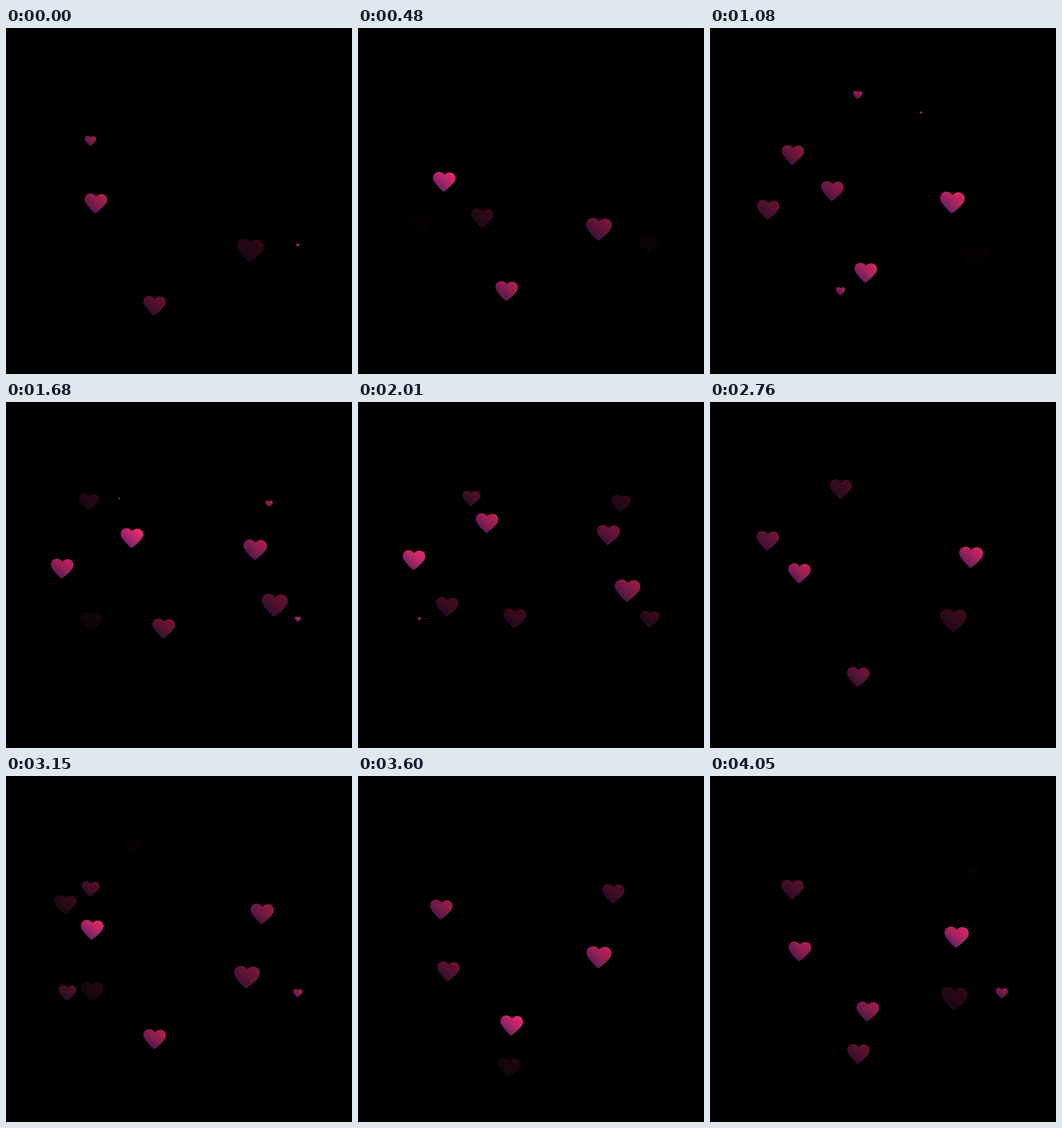
Recreate the animation shown at these times as an HTML page with a canvas. Size 500x500 px, loop 4.08 s.

```html
<!DOCTYPE html>
<html lang="en">
<head>
<meta charset="utf-8">
<title>Floating hearts</title>
<style>
html, body { margin: 0; height: 100%; overflow: hidden; background: #000; }
canvas { display: block; width: 100vmin; height: 100vmin; }
</style>
</head>
<body>
<canvas width="500" height="500"></canvas>
<script>
const LOOP = 4080, STEP = 30, FLOAT = 3060, POP = 560;
const ctx = document.querySelector('canvas').getContext('2d');

// Heart 100 units wide, centred on the origin
const heart = new Path2D('M0-31C8-42 22-46 34-41C50-35 54-15 45-2C38 10 16 32 0 44' +
  'C-16 32-38 10-45-2C-54-15-50-35-34-41C-22-46-8-42 0-31Z');
const pink = ctx.createLinearGradient(32, -40, -26, 32);
pink.addColorStop(0, '#f0286c');
pink.addColorStop(0.5, '#b8286a');
pink.addColorStop(1, '#622466');

// Rising hearts: birth times, start y, rise in px/ms, width, shrink in px/ms, evenly timed x points
const floaters = [
  { births: [-1120, 1550, 2930], y: 326, rise: 0.0647, w: 33, shrink: 0, xs: [121, 130, 129, 121.5, 119, 121] },
  { births: [-300, 2370, 3750], y: 341.4, rise: 0.0645, w: 40, shrink: 0.0028, xs: [357, 349, 348, 358.5, 361.5, 353] },
  { births: [-645, 2025, 3405], y: 430, rise: 0.0441, w: 33, shrink: 0, xs: [220, 214.5, 215.5, 226.5, 227.5, 222.5] },
  { births: [435], y: 287, rise: 0.0371, w: 33, shrink: 0, xs: [90, 84, 81, 81, 84, 88] },
  { births: [150], y: 296.5, rise: 0.0652, w: 33, shrink: 0, xs: [183, 177, 178, 186, 189.5, 184] },
  { births: [1035], y: 335.5, rise: 0.0643, w: 40, shrink: 0.0028, xs: [381, 388, 388, 375, 367.5, 380] }
];

// Hearts that grow and fade in place: x, y, birth times
const pops = [
  [122, 163.5, -190, 2794],
  [421.5, 314, -49, 1589, 2999, 3843],
  [213.5, 97, 929],
  [188.5, 380.5, 929],
  [305, 122.5, 1041],
  [380, 147, 1568],
  [163.5, 139.5, 1652],
  [88.5, 313.5, 1959, 2794]
];

const clamp = v => Math.min(1, Math.max(0, v));

// Catmull-Rom curve through evenly spaced values, p from 0 to 1
function curve(v, p) {
  const n = v.length - 1, s = p * n, i = Math.min(n - 1, Math.floor(s)), u = s - i;
  const b = v[i], c = v[i + 1];
  const a = i ? v[i - 1] : 2 * b - c;
  const d = i < n - 1 ? v[i + 2] : 2 * c - b;
  return b + u / 2 * (c - a + u * (2 * a - 5 * b + 4 * c - d + u * (3 * (b - c) + d - a)));
}

function drawHeart(x, y, w, alpha) {
  ctx.save();
  ctx.translate(x, y);
  ctx.rotate(0.05);
  ctx.scale(w / 100, w / 100);
  ctx.globalAlpha = alpha;
  ctx.fillStyle = pink;
  ctx.fill(heart);
  ctx.restore();
}

function draw(t) {
  ctx.fillStyle = '#000';
  ctx.fillRect(0, 0, 500, 500);
  for (const f of floaters) for (const birth of f.births) {
    const age = t - birth, p = age / FLOAT;
    if (p <= 0 || p >= 1) continue;
    const w = (f.w - f.shrink * age) * (1 - 0.2 * clamp((age - 2680) / 200));
    drawHeart(curve(f.xs, p), f.y - f.rise * age, w, 1 - Math.abs(2 * p - 1));
  }
  for (const [x, y, ...births] of pops) for (const birth of births) {
    const p = (t - birth) / POP;
    if (p > 0 && p < 1) drawHeart(x, y, 30 * p * (2 - p), 1 - p);
  }
}

const start = performance.now();
function tick() {
  const t = (performance.now() - start) % LOOP;
  draw(Math.floor(t / STEP) * STEP);
  requestAnimationFrame(tick);
}
tick();
</script>
</body>
</html>
```
